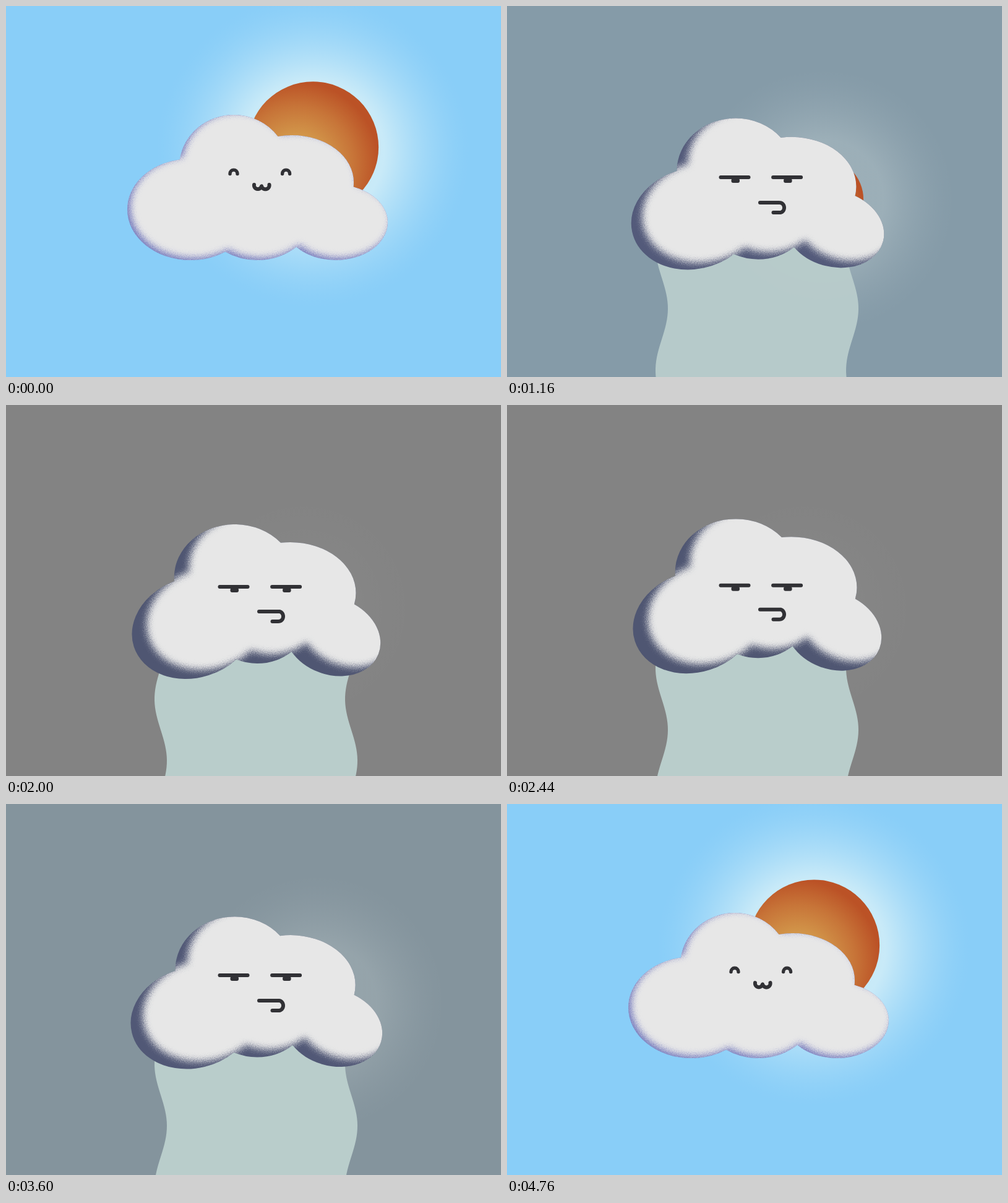
Animation of 800x600 px, one loop 4800 ms. Source, as an HTML page:

```html
<!DOCTYPE html>
<html lang="en">
<head>
<meta charset="utf-8">
<title>Cloud mood</title>
<style>
  html, body { margin: 0; width: 100%; height: 100%; overflow: hidden; }
  svg { display: block; width: 800px; height: 600px; }
</style>
</head>
<body>
<svg viewBox="0 0 800 600" xmlns="http://www.w3.org/2000/svg">
  <defs>
    <radialGradient id="sunFill" cx=".375" cy=".625" r=".625">
      <stop offset="0" stop-color="#d59d4d"/>
      <stop offset=".35" stop-color="#d2964a"/>
      <stop offset=".7" stop-color="#c77438"/>
      <stop offset="1" stop-color="#bb5226"/>
    </radialGradient>
    <radialGradient id="glowFill"></radialGradient>
    <filter id="grain" filterUnits="userSpaceOnUse" x="170" y="150" width="480" height="310" color-interpolation-filters="sRGB">
      <feGaussianBlur in="SourceGraphic" stdDeviation="5.5" result="soft"/>
      <feTurbulence type="fractalNoise" baseFrequency=".85" numOctaves="1" seed="4" result="noise"/>
      <feDisplacementMap in="soft" in2="noise" scale="14" xChannelSelector="R" yChannelSelector="G"/>
    </filter>
    <clipPath id="outline"></clipPath>
  </defs>
  <rect id="sky" width="800" height="600"/>
  <circle id="glow" fill="url(#glowFill)"/>
  <circle id="sun" fill="url(#sunFill)"/>
  <path id="rain" fill="#b9cdcb"/>
  <g id="cloud">
    <g clip-path="url(#outline)">
      <rect id="shade" x="150" y="130" width="530" height="350"/>
      <g filter="url(#grain)"><g id="light" fill="#e7e7e7"></g></g>
    </g>
    <g fill="none" stroke="#313135" stroke-linecap="round" stroke-linejoin="round">
      <g id="eyeL"><path/><rect x="-5.5" y="2" width="13.5" height="7" rx="3" fill="#313135" stroke="none"/></g>
      <g id="eyeR"><path/><rect x="-5.5" y="2" width="13.5" height="7" rx="3" fill="#313135" stroke="none"/></g>
      <path id="mouth" stroke-width="6"/>
    </g>
  </g>
</svg>
<script>
const LOOP = 4800, BOB = 1200, MIDDLE = 406;
const $ = id => document.getElementById(id);
const set = (el, attrs) => { for (const k in attrs) el.setAttribute(k, attrs[k]); };
const make = (tag, attrs = {}, parent) => {
  const el = document.createElementNS('http://www.w3.org/2000/svg', tag);
  set(el, attrs);
  if (parent) parent.append(el);
  return el;
};
const lerp = (a, b, p) => a + (b - a) * p;
const mix = (a, b, p) => a.map((v, i) => lerp(v, b[i], p));
const rgb = c => `rgb(${c.map(Math.round)})`;
const clamp = v => Math.min(1, Math.max(0, v));
const smooth = u => u * u * (3 - 2 * u);
const cubic = u => u < .5 ? 4 * u ** 3 : 1 - 4 * (1 - u) ** 3;

// Rises from a to b, then falls back as a mirror image in the loop.
const swing = (t, a, b, ease) => ease(clamp((Math.min(t, LOOP - t) - a) / (b - a)));

// Sunny shape, then how far it sags, widens and grows taller in gloom
const lobes = [
  { cx: 298, cy: 329, rx: 102, ry: 82, sag: 22, wide: -1, tall: -1 },
  { cx: 406, cy: 321, rx: 98, ry: 90, sag: 3, wide: -10, tall: -5 },
  { cx: 533, cy: 350, rx: 84, ry: 61, sag: 15, wide: -4, tall: 1 },
  { cx: 368, cy: 260, rx: 88, ry: 84, sag: 10, wide: 10, tall: 2 },
  { cx: 462, cy: 285, rx: 100, ry: 76, sag: 10, wide: 6, tall: 6 }
];
const layers = ['outline', 'light'].map(id => lobes.map(() => make('ellipse', {}, $(id))));

for (let i = 0; i <= 20; i++) {
  const alpha = Math.min(.57, 1.5 * (1 - i / 20) ** 1.6);
  make('stop', { offset: i / 20, 'stop-color': '#f8fff8', 'stop-opacity': alpha }, $('glowFill'));
}

// Evenly spaced points, so that two paths can blend
function sample(d, n = 48) {
  const path = make('path', { d }), len = path.getTotalLength();
  return Array.from({ length: n + 1 }, (_, i) => {
    const { x, y } = path.getPointAtLength(len * i / n);
    return [x, y];
  });
}
const smile = sample('M401 289a6 6 0 0 0 12 2a6 6 0 0 0 12.5 -2');
const smirk = sample('M409 318H441a7 8 0 0 1 0 16H430.5');

function drawSky(p, bob) {
  set($('sky'), { fill: rgb(mix([137, 206, 248], [131, 131, 131], p)) });
  const angle = (-39 + 90 * p - 18 * p * p) * Math.PI / 180;
  const dist = 98 + 32 * p - 58 * p * p;
  const x = 420 + dist * Math.cos(angle), y = 290 + dist * Math.sin(angle);
  set($('glow'), { cx: x, cy: y + 6 * (1 - p), r: 256 - 54 * p, opacity: 1 - .96 * p });
  set($('sun'), { cx: x, cy: y + bob, r: 106 - 40 * p - 28 * p * p });
}

function drawRain(t, p) {
  const edge = y => 250 + 10 * Math.cos((y - 525) * Math.PI / 100 - (t - 2440) * 2 * Math.PI / 587);
  const left = [], right = [];
  for (let y = 340; y <= 610; y += 6) {
    left.push(`${edge(y).toFixed(2)} ${y}`);
    right.unshift(`${(edge(y) + 308).toFixed(2)} ${y}`);
  }
  set($('rain'), { d: `M${left.concat(right).join('L')}Z`, opacity: clamp((p - .2) / .5) });
}

function drawCloud(p, bob) {
  set($('cloud'), { transform: `translate(0 ${bob})` });
  lobes.forEach((l, i) => {
    // Gloom squeezes the lobes together and tilts the lower ones outwards.
    const side = l.cx - MIDDLE;
    const cx = l.cx - .045 * side * p, cy = l.cy + l.sag * p;
    const tilt = l.cy > 300 ? .165 * side * p : 0;
    const shape = { cx, cy, rx: l.rx + l.wide * p, ry: l.ry + l.tall * p, transform: `rotate(${tilt} ${cx} ${cy})` };
    for (const layer of layers) set(layer[i], shape);
  });
  set($('shade'), { fill: rgb(mix([120, 125, 190], [79, 86, 114], 1 - (1 - p) ** 2)) });
  set($('light'), { transform: `translate(${lerp(5, 24, p)} ${lerp(-4, -15, p)})` });
}

function drawEye(eye, x, y, q) {
  const w = lerp(6, 22.5, q), end = lerp(3, 0, q), top = lerp(-5.5, 0, q);
  set(eye, { transform: `translate(${x} ${y})` });
  set(eye.firstChild, { d: `M${-w} ${end}C${-w} ${top} ${w} ${top} ${w} ${end}`, 'stroke-width': lerp(5.4, 6, q) });
  set(eye.lastChild, { opacity: clamp(q * 2 - 1) });
}

function drawFace(q, droop) {
  const y = lerp(268.5, 277, q) + 14.5 * droop;
  drawEye($('eyeL'), 368, y, q);
  drawEye($('eyeR'), 452.6, y, q);
  const bend = clamp((q - .2) / .8);
  const points = smile.map((pt, i) => mix(pt, smirk[i], bend).map(v => v.toFixed(2)).join(' '));
  set($('mouth'), { d: `M${points.join('L')}`, transform: `translate(0 ${12.5 * droop})` });
}

function draw(t) {
  const bob = 6 * (1 - Math.cos(t * 2 * Math.PI / BOB));
  const gloom = swing(t, 700, 1510, cubic);
  const delay = t < LOOP / 2 ? 0 : 60;
  drawSky(gloom, bob);
  drawRain(t, gloom);
  drawCloud(gloom, bob);
  drawFace(swing(t, 900 + delay, 1140 + delay, smooth), swing(t, 1680, 2280, smooth));
}

const start = performance.now();
function tick() {
  draw((performance.now() - start) % LOOP);
  requestAnimationFrame(tick);
}
tick();
</script>
</body>
</html>
```
